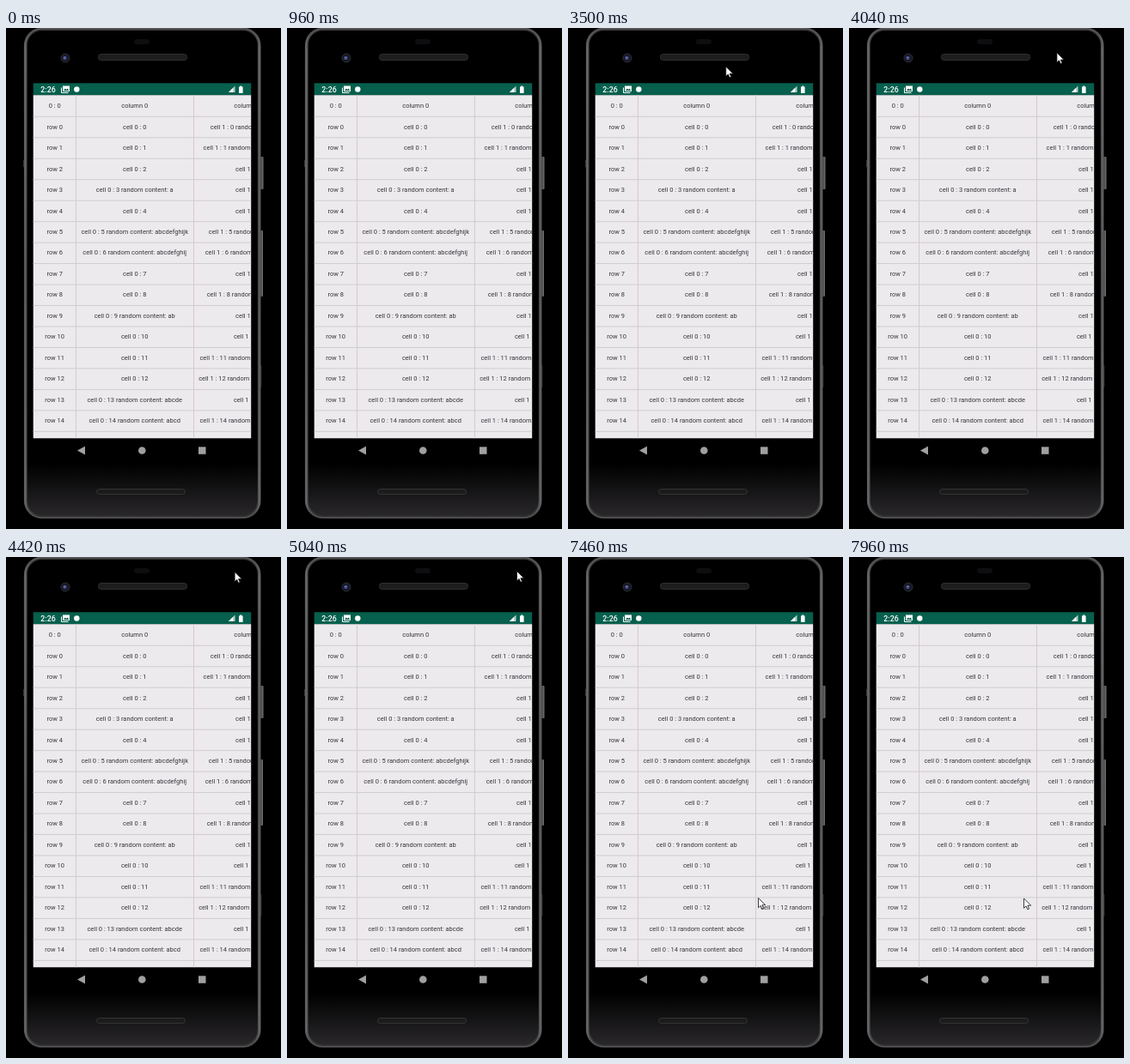
Write an HTML page that moves like this. It is 320 px wide and 584 px high and loops after 8000 ms.

```html
<!DOCTYPE html>
<html lang="en">
<head>
<meta charset="utf-8">
<title>Table on a phone</title>
<style>
html, body { margin: 0; width: 100%; height: 100%; overflow: hidden; background: #000; }
svg { display: block; width: 100vw; height: 100vh; }
text { font-family: Roboto, sans-serif; white-space: pre; }
#cells { font-size: 7.5px; fill: #37353a; text-anchor: middle; }
</style>
</head>
<body>
<svg viewBox="0 0 320 584">
  <defs>
    <clipPath id="screen"><rect x="31.7" y="78.3" width="253.5" height="400"/></clipPath>
    <linearGradient id="edge" x1="0" y1="0" x2="0" y2="1">
      <stop offset="0" stop-color="#3a3a3a"/>
      <stop offset=".04" stop-color="#585858"/>
      <stop offset=".5" stop-color="#484848"/>
      <stop offset=".97" stop-color="#545454"/>
      <stop offset="1" stop-color="#303030"/>
    </linearGradient>
    <linearGradient id="glow" x1="0" y1="0" x2="0" y2="1">
      <stop offset=".89" stop-color="#000"/>
      <stop offset="1" stop-color="#2a282b"/>
    </linearGradient>
    <linearGradient id="key" x1="0" x2="1">
      <stop offset="0" stop-color="#2c2c2c"/>
      <stop offset="1" stop-color="#757575"/>
    </linearGradient>
  </defs>
  <rect width="320" height="584"/>

  <g id="body">
    <rect x="295" y="150" width="4.5" height="38" rx="1" fill="url(#key)"/>
    <rect x="295" y="236" width="4" height="77" rx="1" fill="url(#key)"/>
    <rect x="295" y="393" width="2.5" height="26" rx="1" fill="#2a2a2a"/>
    <rect x="20" y="154" width="2" height="8" fill="#333"/>
    <rect x="22.7" y="1.2" width="272" height="569" rx="19" fill="url(#glow)" stroke="url(#edge)" stroke-width="3.6"/>
    <rect x="22.2" y=".7" width="273" height="570" rx="19.500" fill="none" stroke="#8a8a8a" stroke-opacity=".55"/>
    <rect x="149" y="13" width="18" height="6" rx="3" fill="#0e0e10"/>
    <rect x="107.500" y="30.500" width="103" height="7" rx="3" fill="#1d1d1d" stroke="#303030"/>
    <rect x="105.500" y="537.500" width="103" height="6" rx="3" fill="#1b1b1b" stroke="#343434"/>
    <circle cx="69" cy="35" r="5" fill="#161823" stroke="#2b2d38"/>
    <circle cx="68.500" cy="35" r="2.200" fill="#454c88"/>
    <circle cx="68" cy="34.500" r=".8" fill="#8088c0"/>
  </g>

  <g id="status" fill="#fff">
    <rect x="31.700" y="64.300" width="253.500" height="14" fill="#06604d"/>
    <text x="40.300" y="74.800" font-size="8.800" font-weight="500">2:26</text>
    <path d="M66 67.500h8v6.500h-8z"/>
    <path d="M64.500 69.500v6h8" fill="none" stroke="#fff"/>
    <path d="M67 73l2-2.500 1.300 1.500 1.200-1.500 1.800 2.500z" fill="#06604d"/>
    <circle cx="82.300" cy="71.500" r="3.200"/>
    <path d="M266.500 67.500v7.500h-7.500z" opacity=".7"/>
    <path d="M264 70v5h-5z"/>
    <path d="M271 68.500h1.300v-1h2v1h1.300v7.500h-4.600z"/>
  </g>

  <g clip-path="url(#screen)">
    <rect x="31" y="78" width="255" height="401" fill="#eceaed"/>
    <g id="lines"></g>
    <g id="cells"></g>
  </g>

  <g id="nav" fill="#a0a0a0">
    <path d="M92 487.500v10l-9-5z"/>
    <circle cx="158.300" cy="492.500" r="4.300"/>
    <rect x="224" y="488.300" width="8.500" height="8.500"/>
  </g>

  <path id="cursor" d="M0 0V11.300L2.600 8.900 4.300 12.800 6.100 12 4.400 8.200H8.200Z" fill="#fff" stroke="#111" stroke-width=".8"/>
</svg>
<script>
const LOOP = 8000, FPS = 24, ROWS = 15, PITCH = 24.47;
const $ = id => document.getElementById(id);

function add(parent, tag, attrs, text) {
  const el = document.createElementNS('http://www.w3.org/2000/svg', tag);
  for (const k in attrs) el.setAttribute(k, attrs[k]);
  if (text) el.textContent = text;
  $(parent).append(el);
}

// Cells with a tail, as row: letters
const tails = [
  { 3: 'a', 5: 'abcdefghijk', 6: 'abcdefghij', 9: 'ab', 13: 'abcde', 14: 'abcd' },
  { 0: '', 1: 'abcd', 5: 'a', 6: 'abc', 8: 'ab', 11: 'abcde', 12: 'abcdef', 14: 'abcde' }
];

function cellText(col, row) {
  const tail = tails[col][row];
  return `cell ${col} : ${row}` + (tail === undefined ? '' : ' random content: ' + tail);
}

function column(x, head, text) {
  for (let r = -1; r < ROWS; r++)
    add('cells', 'text', { x, y: 93.2 + PITCH * (r + 1) }, r < 0 ? head : text(r));
}

function buildTable() {
  for (let i = 0; i <= ROWS; i++)
    add('lines', 'rect', { x: 31, y: 102.8 + PITCH * i, width: 255, height: 1, fill: '#cfcecd' });
  for (const x of [81, 218])
    add('lines', 'rect', { x, y: 78, width: 1, height: 401, fill: '#d9c9c7' });

  column(56.7, '0 : 0', r => 'row ' + r);
  column(149.7, 'column 0', r => cellText(0, r));
  column(280.7, 'column 1', r => cellText(1, r));
}

// Pointer moves between rests, in ms
const entry = { x: 1, y: 93 };
const moves = [
  { from: 1750, to: 2040, x: 210, y: 26 },
  { from: 3380, to: 3670, x: 170, y: 55 },
  { from: 3670, to: 4170, x: 247, y: 27 },
  { from: 4250, to: 4460, x: 267, y: 17 },
  { from: 4750, to: 5040, x: 267.5, y: 16.5 },
  { from: 7000, to: 7040, x: 265, y: 34 },
  { from: 7040, to: 7460, x: 221.5, y: 397.5 },
  { from: 7460, to: 7840, x: 206, y: 400 },
  { from: 7880, to: 7960, x: 203.5, y: 398 }
];
const easeOut = u => 1 - (1 - u) ** 2;

function pointAt(ms) {
  let { x, y } = entry;
  for (const m of moves) {
    const u = easeOut(Math.min(1, Math.max(0, (ms - m.from) / (m.to - m.from))));
    x += (m.x - x) * u;
    y += (m.y - y) * u;
  }
  return [x, y];
}

function draw(time) {
  const ms = time % LOOP;
  const tick = Math.floor((ms + 3) * FPS / 1000) * 1000 / FPS;
  $('cursor').setAttribute('visibility', ms >= moves[0].from ? 'visible' : 'hidden');
  $('cursor').setAttribute('transform', `translate(${pointAt(tick)})`);
}

buildTable();
draw(0);
let start;
requestAnimationFrame(function loop(now) {
  start ??= now;
  draw(now - start);
  requestAnimationFrame(loop);
});
</script>
</body>
</html>
```
